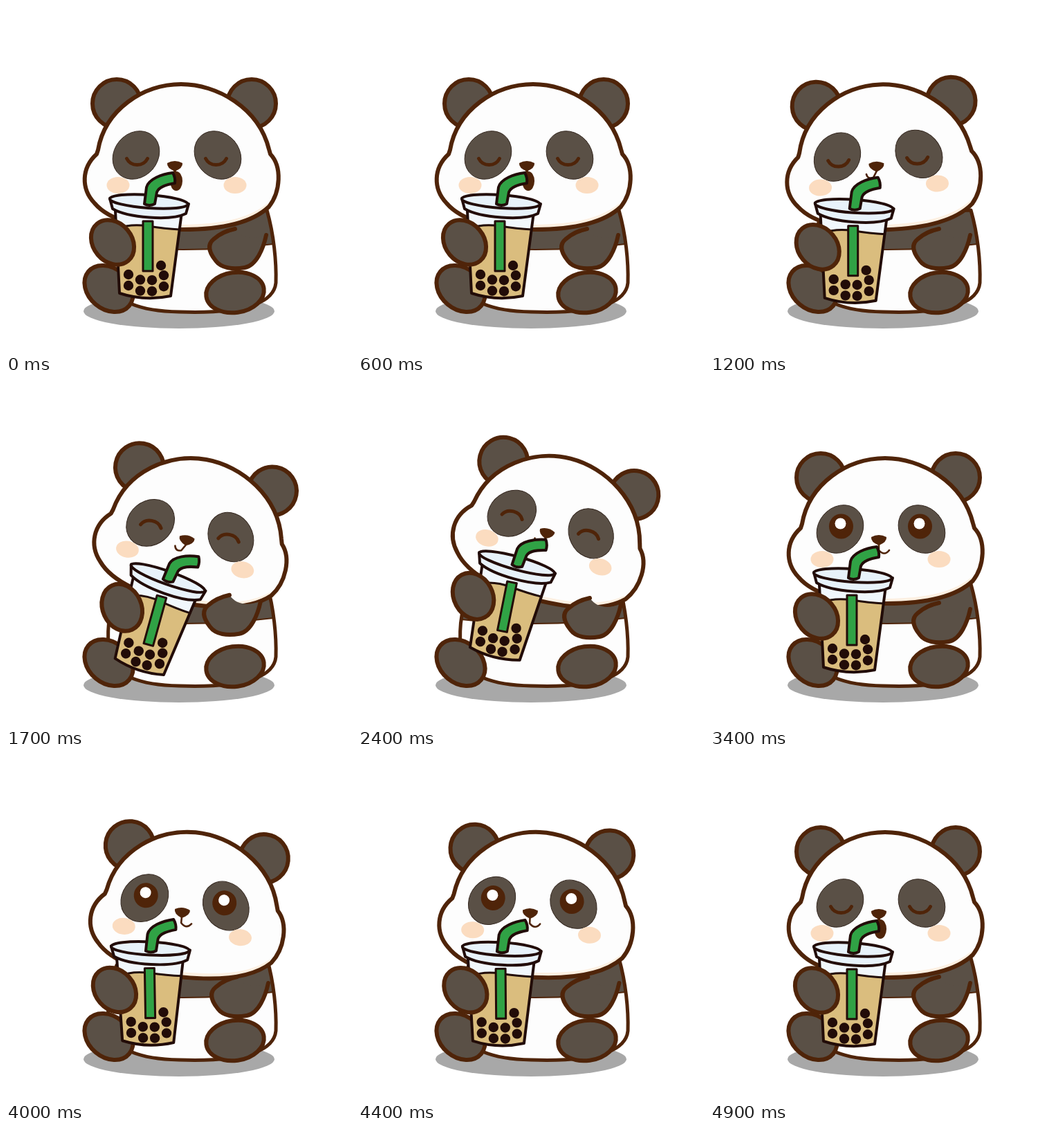
An HTML page with a canvas that plays this animation: 500 px wide and 500 px high, repeating every 5000 ms.

```html
<!DOCTYPE html>
<html lang="en">
<head>
<meta charset="utf-8">
<title>Panda with bubble tea</title>
<style>
  html, body { margin: 0; width: 100%; height: 100%; overflow: hidden; background: #fff; }
  canvas { display: block; width: 100vmin; height: 100vmin; }
</style>
</head>
<body>
<canvas id="stage" width="500" height="500"></canvas>
<script>
const ctx = document.getElementById('stage').getContext('2d');
const LOOP = 5000, STEP = 100;
const BROWN = '#4f2409', FUR = '#5a5046', WHITE = '#fdfdfd', INK = '#220c08';
const GREEN = '#30a245', TEA = '#dabd7e', ICE = '#e8f2fa', BLUSH = '#fbdcc0';
const SIDES = [-1, 1];

const shape = {
  body: new Path2D('M160 305C146 340 146 375 150 400C160 430 200 441 250 442C310 444 386 440 390 400C391 370 387 330 377 295Z'),
  chest: new Path2D('M140 280H395V343Q260 360 140 345Z'),
  head: new Path2D('M253 113C198 113 143 150 133 208L131 214C109 234 108 264 128 285C150 311 200 323 255 323C310 323 355 314 380 290C397 268 399 232 382 214L380 207C365 147 305 113 253 113Z'),
  nose: new Path2D('M233 227Q244 221 255 227Q256 234 244 239Q232 234 233 227Z'),
  cup: new Path2D('M158 296L164 415Q200 427 238 419L254 298Z'),
  tea: new Path2D('M159 322Q180 314 205 318T252 323L238 419Q200 427 164 415Z'),
  surface: new Path2D('M160 322Q180 314 205 318T251 323'),
  rim: new Path2D('M150 278L154 293C176 306 238 311 260 300L264 286Z'),
  straw: new Path2D('M200 286L203 262C206 250 225 243 241 241Q245 248 244 256C232 258 221 261 218 269L215 286Q207 290 200 286Z'),
  dip: new Path2D('M198 311H212V383H198Z'),
  sleeve: new Path2D('M331 322Q312 326 300 337C289 346 295 358 303 368C311 379 328 381 345 378C362 375 372 350 376 331'),
  sleeveFill: new Path2D('M331 322Q312 326 300 337C289 346 295 358 303 368C311 379 328 381 345 378C362 375 372 350 376 331Q345 342 331 322Z')
};

// Smooth step from 0 to 1 between a and b
function ramp(t, a, b) {
  const u = Math.min(1, Math.max(0, (t - a) / (b - a)));
  return (1 - Math.cos(Math.PI * u)) / 2;
}
const pulse = (t, a, b, c, d) => ramp(t, a, b) - ramp(t, c, d);

function poseAt(t) {
  const back = pulse(t, 1080, 1410, 1410, 1820);
  const lean = pulse(t, 1410, 1820, 2700, 3400);
  const sip = pulse(t, 1750, 2050, 2700, 3400);
  const sway = pulse(t, 3400, 3950, 3950, 4800);
  const dip = pulse(t, 600, 1400, 1700, 2050);
  return {
    head: { x: 3 * sip + sway, y: -4 * sip, deg: 14.3 * lean - 7 * back + 5.6 * sway },
    face: 2 * lean - 7 * sip - sway,
    cup: {
      x: 2 * dip + 30 * lean - 8 * sip + 2 * sway,
      y: 8 * dip - 6 * lean - 12 * sip - 1.5 * sway,
      deg: 19.3 * lean - 8 * sip - sway
    },
    arm: { x: 14 * sip - 10 * lean + 3 * sway, y: 7 * sip - 14 * lean, deg: 0 },
    mood: t < 1400 || t >= 4600 ? 'closed' : t < 3200 ? 'happy' : 'open',
    mouth: t < 700 || t >= 4600 ? 'sip' : t < 2700 ? 'left' : 'right'
  };
}

function paint(path, fill, line, width) {
  if (fill) { ctx.fillStyle = fill; ctx.fill(path); }
  if (line) { ctx.strokeStyle = line; ctx.lineWidth = width; ctx.stroke(path); }
}

function oval(x, y, rx, ry, fill, line, width, tilt = 0) {
  const p = new Path2D();
  p.ellipse(x, y, rx, ry, tilt * Math.PI / 180, 0, Math.PI * 2);
  paint(p, fill, line, width);
}

function placed(px, py, { x, y, deg }, draw) {
  ctx.save();
  ctx.translate(px + x, py + y);
  ctx.rotate(deg * Math.PI / 180);
  ctx.translate(-px, -py);
  draw();
  ctx.restore();
}

function inside(path, draw) {
  ctx.save();
  ctx.clip(path);
  draw();
  ctx.restore();
}

function body() {
  oval(250, 441, 138, 25, 'rgba(0,0,0,.34)');
  paint(shape.body, WHITE);
  inside(shape.body, () => paint(shape.chest, FUR, BROWN, 2));
  paint(shape.body, null, BROWN, 5);
  oval(148.5, 408.5, 38.5, 29.5, FUR, BROWN, 6, 40);
  oval(331, 414, 42, 29, FUR, BROWN, 6, -8);
}

function eye(x, y, mood) {
  if (mood === 'open') {
    oval(x, y - 9, 17.5, 18, BROWN);
    oval(x - 1, y - 13, 8, 8, '#fff');
    return;
  }
  const bend = mood === 'happy' ? -11 : 12;
  paint(new Path2D(`M${x - 15} ${y}C${x - 9} ${y + bend} ${x + 9} ${y + bend} ${x + 15} ${y}`), null, BROWN, 5);
}

function mouth(kind) {
  if (kind === 'sip') {
    oval(246, 253, 9, 14, BROWN);
    paint(new Path2D('M244 234V243'), null, BROWN, 4);
  } else {
    const smile = kind === 'left' ? 'M244 238L239 247Q231 250 229 242' : 'M244 238V246Q252 255 259 246';
    paint(new Path2D(smile), null, BROWN, 2.6);
  }
}

function head(pose) {
  for (const s of SIDES) oval(257.5 + 97.5 * s, 141, 35, 35, FUR, BROWN, 6);
  paint(shape.head, WHITE);
  inside(shape.head, () => paint(new Path2D('M230 320C310 321 350 312 378 290'), null, '#fdf0e2', 8));
  paint(shape.head, null, BROWN, 6);

  ctx.translate(pose.head.deg * .15, pose.face);
  for (const s of SIDES) {
    oval(247 + 59 * s, 215.5, 31.5, 37, FUR, '#33261e', 1, -40 * s);
    eye(246.5 + 57 * s, 220.5, pose.mood);
    oval(246.5 + 84.5 * s, 259, 16.5, 12, BLUSH);
  }
  mouth(pose.mouth);
  paint(shape.nose, BROWN);
}

function drink() {
  paint(shape.cup, '#f1f7fc');
  paint(shape.tea, TEA);
  paint(shape.surface, null, INK, 3);
  paint(shape.dip, GREEN, INK, 3);
  oval(224, 375, 7.2, 7.2, INK);
  for (let i = 0; i < 8; i++) {
    const col = i % 4, row = i >> 2;
    oval(177 + 17 * col, 388 + 16 * row + 9 * Math.sin(col), 7.2, 7.2, INK);
  }
  paint(shape.cup, null, INK, 4);
  paint(shape.rim, ICE, INK, 4);
  oval(206.5, 282.5, 56.5, 9.5, ICE, INK, 4, 4);
  paint(shape.straw, GREEN, INK, 4);
}

function draw(t) {
  const pose = poseAt(t);
  ctx.fillStyle = '#fff';
  ctx.fillRect(0, 0, 500, 500);
  ctx.lineCap = ctx.lineJoin = 'round';
  body();
  placed(260, 320, pose.head, () => head(pose));
  placed(0, 0, pose.arm, () => {
    paint(shape.sleeveFill, FUR);
    paint(shape.sleeve, null, BROWN, 6);
  });
  placed(206, 288, pose.cup, () => {
    drink();
    oval(154, 341.5, 35, 28, FUR, BROWN, 6, 50);
  });
}

const start = performance.now();
function tick() {
  const t = (performance.now() - start) % LOOP;
  draw(Math.floor(t / STEP) * STEP);
  requestAnimationFrame(tick);
}
tick();
</script>
</body>
</html>
```
